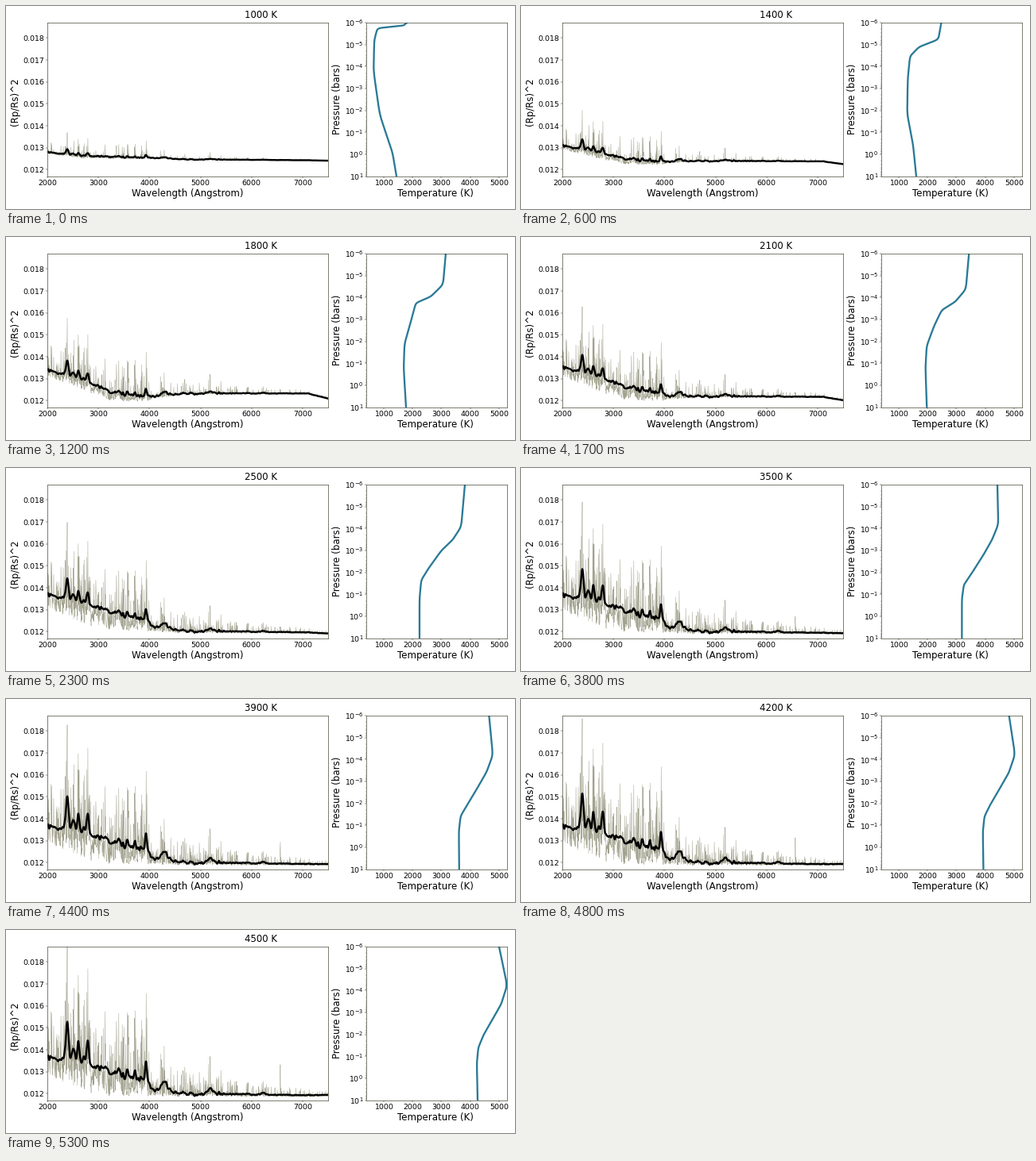
Write a matplotlib script that moves like this. It is 640 px wide and 256 px high and loops after 5.5 s.

```python
import numpy as np
import matplotlib.pyplot as plt
from matplotlib.animation import FuncAnimation
from matplotlib.ticker import LogLocator, NullFormatter

W, H, DPI = 640, 256, 64
TOP, BOTTOM = 21, 214.7
plt.rcParams.update({"font.family": "DejaVu Sans", "font.size": 10.6,
                     "axes.edgecolor": "#33331f", "axes.linewidth": 0.7})

KEY_T = [1000, 1800, 2500, 4500]

# Spectrum depths are in units of 1e-3
CONT_X = [2000, 2650, 3250, 3950, 4050, 4700, 7100, 7500]
CONT = {1000: [12.80, 12.63, 12.58, 12.55, 12.54, 12.47, 12.43, 12.41],
        1800: [13.40, 13.00, 12.35, 12.20, 12.20, 12.33, 12.33, 12.10],
        2500: [13.70, 13.35, 12.85, 12.55, 12.25, 12.03, 11.97, 11.92],
        4500: [13.65, 13.45, 12.90, 12.60, 12.20, 12.00, 11.93, 11.95]}

# Absorption bands: centre, width, height at the hottest step
BANDS = [(2390, 45, 1.45), (2520, 35, 0.65), (2605, 25, 0.85), (2720, 25, 0.4),
         (2795, 32, 1.1), (3130, 60, 0.25), (3400, 30, 0.2), (3570, 40, 0.25),
         (3720, 28, 0.35), (3850, 30, 0.25), (3935, 25, 0.7), (4290, 90, 0.4),
         (5190, 60, 0.27), (6230, 60, 0.08)]

# Pressure profiles: (kelvin, log10 bars), matched from top to bottom
PROFILES = {
    1000: [(1800, -6), (1690, -5.87), (780, -5.75), (670, -5.2),
           (645, -3.8), (860, -1.8), (1300, -0.1), (1441, 1)],
    1800: [(3150, -6), (3060, -4.6), (2640, -4.05), (2110, -3.75),
           (1980, -3.1), (1720, -1.9), (1690, -0.8), (1772, 1)],
    2500: [(3814, -6), (3690, -4.1), (3400, -3.5), (3000, -3.0),
           (2560, -2.2), (2300, -1.65), (2240, -0.8), (2240, 1)],
    3500: [(4421, -6), (4455, -4.2), (4240, -3.5), (3960, -2.85),
           (3600, -2.1), (3260, -1.45), (3190, -0.8), (3190, 1)],
    4500: [(5000, -6), (5280, -4.25), (5080, -3.4), (4800, -2.75),
           (4470, -2.0), (4280, -1.4), (4228, -0.7), (4256, 1)]}


def blend(temp, rows):
    """Linear mix of the two rows on either side of temp."""
    keys = sorted(rows)
    i = min(max(np.searchsorted(keys, temp) - 1, 0), len(keys) - 2)
    a, b = keys[i], keys[i + 1]
    k = (temp - a) / (b - a)
    return (1 - k) * np.array(rows[a]) + k * np.array(rows[b])


def bell(x, centre, width):
    return np.exp(-((x - centre) / width) ** 2)


def soften(values, n=240, half=11):
    """Resample a polyline and round off its corners."""
    v = np.interp(np.linspace(0, len(values) - 1, n), np.arange(len(values)), values)
    ends = np.pad(v, half, mode="reflect", reflect_type="odd")
    kernel = np.hanning(2 * half + 3)[1:-1]
    return np.convolve(ends, kernel / kernel.sum(), "valid")


rng = np.random.default_rng(7)
lam = np.linspace(2000, 7500, 1200)
bands = sum(h * bell(lam, c, w) for c, w, h in BANDS)
reach = np.interp(lam, [2000, 3950, 4050, 5450, 5650, 7500],
                  [2.1, 2.5, 1.3, 1.2, 0.6, 0.2]) + bands
drop = np.interp(lam, [2000, 2650, 3950, 4050, 4700, 7500],
                 [0.8, 1.35, 0.7, 0.35, 0.12, 0.07])
spread = np.linspace(1, 2.4, lam.size)

luck = rng.random(lam.size)
trough = rng.random(lam.size)
for centre, _, _ in BANDS:
    luck[np.argmin(abs(lam - centre))] = 0.995

kernel = np.hanning(13)
wiggle = np.convolve(rng.normal(size=lam.size), kernel / np.sqrt((kernel ** 2).sum()),
                     "same") * 0.045 * reach / 1.5


def spectrum(temp):
    band, tall, deep, power = [
        np.interp(temp, KEY_T, v) for v in
        ([0.12, 0.35, 0.5, 1], [0.22, 0.55, 0.72, 1],
         [0.08, 0.35, 0.75, 1], [10, 5, 3.5, 3])]
    cont = np.interp(lam, CONT_X, blend(temp, CONT))
    smooth = cont + band * bands + tall * wiggle
    low = cont - deep * drop
    low += 0.8 * trough * (smooth - low)
    raw = low + (smooth + tall * reach - low) * luck ** (power * spread)
    raw += max(temp - 2500, 0) / 2000 * 1.45 * bell(lam, 6563, 3)
    return raw / 1000, smooth / 1000


def profile(temp):
    kelvin, log_p = blend(temp, PROFILES).T
    return soften(kelvin), 10 ** soften(log_p)


fig = plt.figure(figsize=(W / DPI, H / DPI), dpi=DPI, facecolor="white")


def add_axes(left, right):
    axes = fig.add_axes([left / W, 1 - BOTTOM / H, (right - left) / W,
                         (BOTTOM - TOP) / H])
    axes.tick_params(length=2.4, width=0.5, pad=2)
    axes.tick_params(which="minor", length=1.4, width=0.4)
    return axes


def label(x, y, text, size=13.2, **kw):
    return fig.text(x / W, 1 - y / H, text, fontsize=size, ha="center", **kw)


ax = add_axes(52, 405)
ax.set_xlim(2000, 7500)
ax.set_ylim(0.0117, 0.0187)
ax.set_xticks(range(2000, 7001, 1000))
ax.set_yticks(np.arange(12, 19) / 1000)
ax.yaxis.set_major_formatter("{x:.3f}")

tp = add_axes(453, 629.5)
tp.set_yscale("log")
tp.set_xlim(393, 5263)
tp.set_ylim(10, 1e-6)
tp.set_xticks(range(1000, 5001, 1000))
tp.yaxis.set_major_locator(LogLocator(numticks=20))
tp.yaxis.set_minor_locator(LogLocator(subs=np.arange(2, 10), numticks=20))
tp.yaxis.set_minor_formatter(NullFormatter())

label(228.5, 240.3, "Wavelength (Angstrom)", va="baseline")
label(540.4, 240.3, "Temperature (K)", va="baseline")
label(11.3, 120.5, "(Rp/Rs)^2", va="center", rotation=90)
label(416.8, 117.5, "Pressure (bars)", va="center", rotation=90)
title = label(320.3, 15.3, "", size=13.2, va="baseline")

raw_line, = ax.plot([], [], color="#3c3c14", alpha=0.48, lw=0.55)
smooth_line, = ax.plot([], [], color="black", lw=2.7)
tp_line, = tp.plot([], [], color="#2a7a96", lw=2.6)


def draw(i):
    # Two steps every 300 ms: the first held for 200 ms, the next for 100 ms
    step = min(2 * (i // 3) + (i % 3 == 2), 35)
    temp = 1000 + 100 * step
    raw, smooth = spectrum(temp)
    raw_line.set_data(lam, raw)
    smooth_line.set_data(lam, smooth)
    tp_line.set_data(*profile(temp))
    title.set_text(f"{temp} K")
    return raw_line, smooth_line, tp_line, title


anim = FuncAnimation(fig, draw, frames=55, interval=100, repeat=True,
                     repeat_delay=0, blit=False)
plt.show()
```
